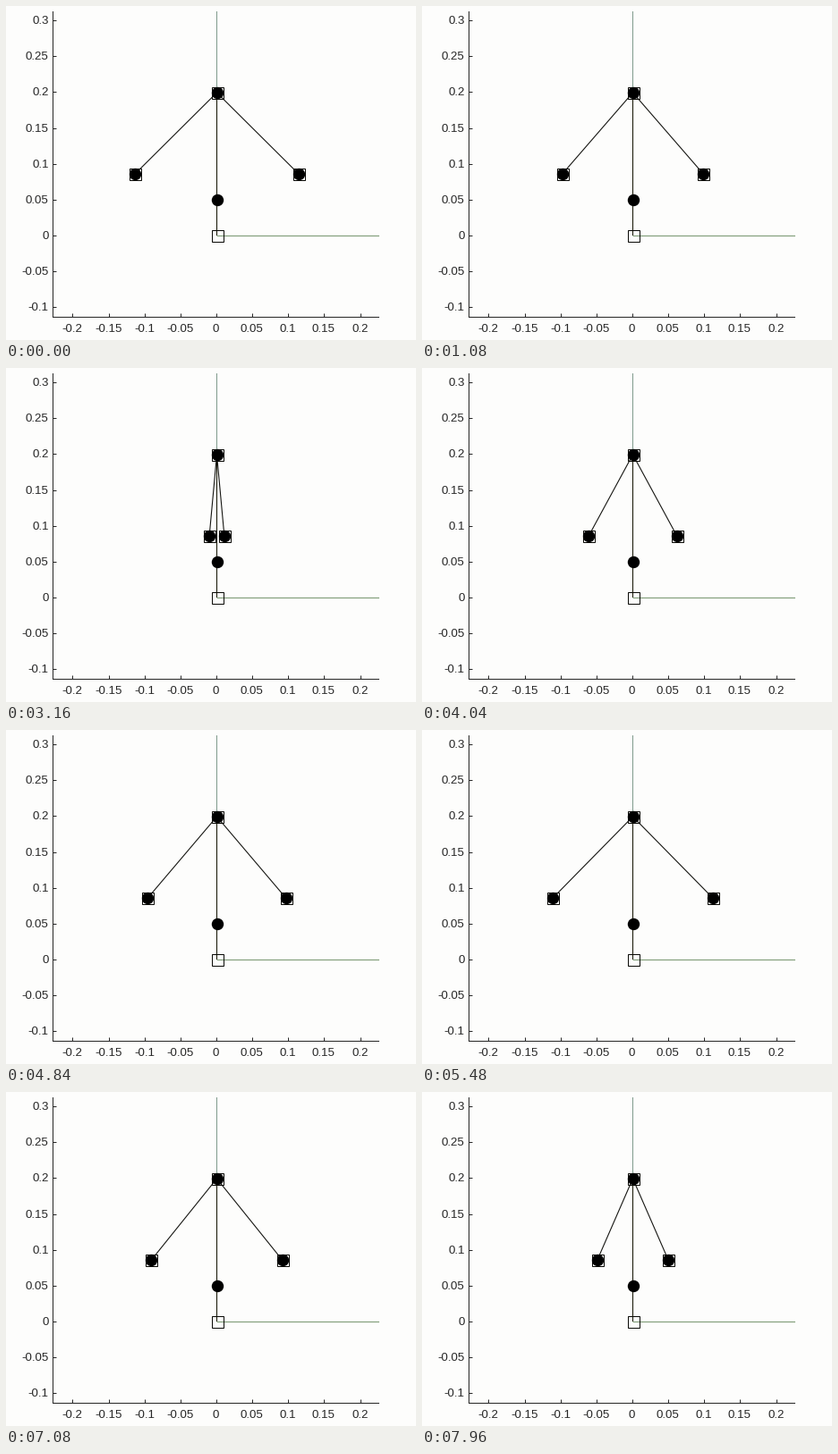
These frames come from a looping animation (458x374 px, 8000 ms). A matplotlib script:

```python
import numpy as np
import matplotlib.pyplot as plt
from matplotlib.animation import FuncAnimation

W, H, DPI = 458, 374, 100
PX = 72 / DPI                      # one pixel in points
FRAMES, STEP = 200, 40             # 8 s loop
X0, Y0 = 235.5, 257.4              # data origin in pixels
SX, SY = 803, 802                  # pixels per data unit
INK, DARK = "#262626", "#141410"
RADIUS, TOP, BOB_Y = 0.1139, 0.2, 0.0865
START, SPEED = -2.9, 31.06         # degrees, degrees per second


def px(x):
    return X0 + SX * x


def py(y):
    return Y0 - SY * y


def mid(v):
    """Centre of the pixel that holds v."""
    return np.floor(v) + 0.5


fig = plt.figure(figsize=(W / DPI, H / DPI), dpi=DPI, facecolor="#fdfdfc")
ax = fig.add_axes([0, 0, 1, 1])
ax.set_xlim(0, W)
ax.set_ylim(H, 0)
ax.axis("off")


def line(xs, ys, color, width=1.0, z=1):
    return ax.plot(xs, ys, color=color, lw=width * PX, zorder=z,
                   solid_capstyle="butt", snap=False)[0]


def square(x, y):
    return ax.plot([x], [y], "s", ms=13 * PX, mfc="none", mec="#0a0a06",
                   mew=PX, zorder=4, snap=False)[0]


def ball(x, y):
    return ax.plot([x], [y], "o", ms=13.4 * PX, mfc="black", mec="none",
                   zorder=5, snap=False)[0]


def label(x, y, value, align):
    ax.text(x, y, f"{value:g}", family="Liberation Sans", fontsize=13.3 * PX,
            color=INK, ha=align, va="baseline")


# Axes box, ticks and labels
LEFT, RIGHT, UPPER, LOWER = 52.5, 417, 6, 348.5
line([LEFT, LEFT], [UPPER, LOWER + 0.5], INK)
line([LEFT - 0.5, RIGHT], [LOWER, LOWER], INK)
for i in range(-4, 5):
    x = mid(px(i / 20))
    line([x, x], [LOWER, LOWER - 4], INK)
    label(x - 0.9, 364.6, i / 20, "center")
for i in range(-2, 7):
    y = mid(py(i / 20))
    line([LEFT, LEFT + 4], [y, y], INK)
    label(47.6, y + 3.9, i / 20, "right")

# World axes and the fixed shaft
line([X0, X0], [UPPER, py(TOP)], "#7f9a8c")
line([X0, RIGHT], [257.5, 257.5], "#84a07c", 1.2)
line([X0, X0], [py(TOP), 257], "#1c1c0c", 1.1, 2)
square(236, 257)
ball(X0, py(0.05))
square(X0, 97)
ball(X0, 97)

# Two swinging arms, each with a boxed bob
arms = [(side, line([], [], DARK, 1.1, 3), square(X0, 0), ball(X0, 0))
        for side in (-1, 1)]


def draw(k):
    turn = np.radians(START + SPEED * k * STEP / 1000)
    reach = RADIUS * abs(np.cos(turn))
    y = round(py(BOB_Y))
    for side, rod, box, bob in arms:
        x = px(side * reach)
        rod.set_data([X0, x], [py(TOP), y])
        box.set_data([round(x)], [y])
        bob.set_data([round(x)], [y])
    return [part for arm in arms for part in arm[1:]]


anim = FuncAnimation(fig, draw, frames=FRAMES, interval=STEP, repeat=True,
                     repeat_delay=0, init_func=lambda: draw(0))
plt.show()
```
